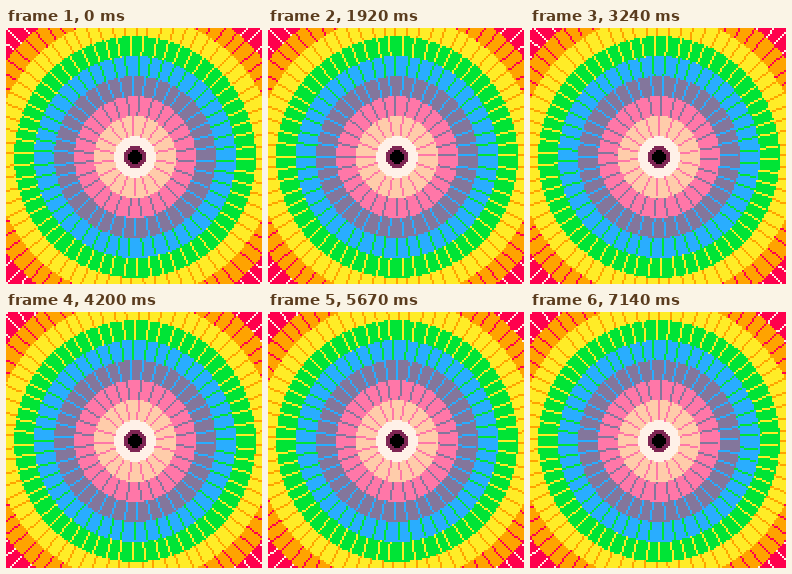
These frames come from a looping animation (256 px wide and 256 px high, 7170 ms). An HTML page with a canvas:

```html
<!DOCTYPE html>
<html lang="en">
<head>
<meta charset="utf-8">
<title>Turning rings</title>
<style>
  html, body { margin: 0; width: 100%; height: 100%; overflow: hidden; background: #ff004d; }
  canvas { display: block; width: 100vw; height: 100vh; image-rendering: pixelated; }
</style>
</head>
<body>
<canvas id="stage" width="128" height="128"></canvas>
<script>
const ctx = document.getElementById('stage').getContext('2d');
const CENTER = 64, STEP = 30, FRAMES = 239, TAU = Math.PI * 2;
const START_TURN = 69.8 / 360;      // in turns
const TURN_PER_FRAME = -1 / 330;
const WHITE = '#fff1e8', PLUM = '#7e2553', BLACK = '#000000';

// Outermost ring first; each ring's spokes take the colour of the ring outside it.
const RINGS = ['#ff004d', '#ffa300', '#ffec27', '#00e436', '#29adff', '#83769c', '#ff77a8', '#ffccaa'];

function disc(radius, color) {
  ctx.fillStyle = color;
  for (let y = -radius; y <= radius; y++) {
    const half = Math.floor(Math.sqrt(radius * radius + radius * 0.8 - y * y));
    ctx.fillRect(CENTER - half, CENTER + y, half * 2 + 1, 1);
  }
}

// A one-pixel line from the centre to a whole-pixel end point.
function spoke(angle, length) {
  const dx = Math.floor(Math.cos(angle) * length);
  const dy = Math.floor(Math.sin(angle) * length);
  const steps = Math.max(Math.abs(dx), Math.abs(dy));
  for (let i = 0; i <= steps; i++) {
    ctx.fillRect(CENTER + Math.round(dx * i / steps), CENTER + Math.round(dy * i / steps), 1, 1);
  }
}

function draw(frame) {
  const turn = START_TURN + frame * TURN_PER_FRAME;
  RINGS.forEach((color, i) => {
    const radius = 90 - i * 10;
    const count = radius - 2;
    disc(radius, color);
    ctx.fillStyle = i ? RINGS[i - 1] : WHITE;
    for (let k = 0; k < count; k++) spoke((k / count + turn) * TAU, radius);
  });
  disc(10, WHITE);
  disc(5, PLUM);
  disc(3, BLACK);
}

function tick(now) {
  draw(Math.floor(now / STEP) % FRAMES);
  requestAnimationFrame(tick);
}

draw(0);
requestAnimationFrame(tick);
</script>
</body>
</html>
```
